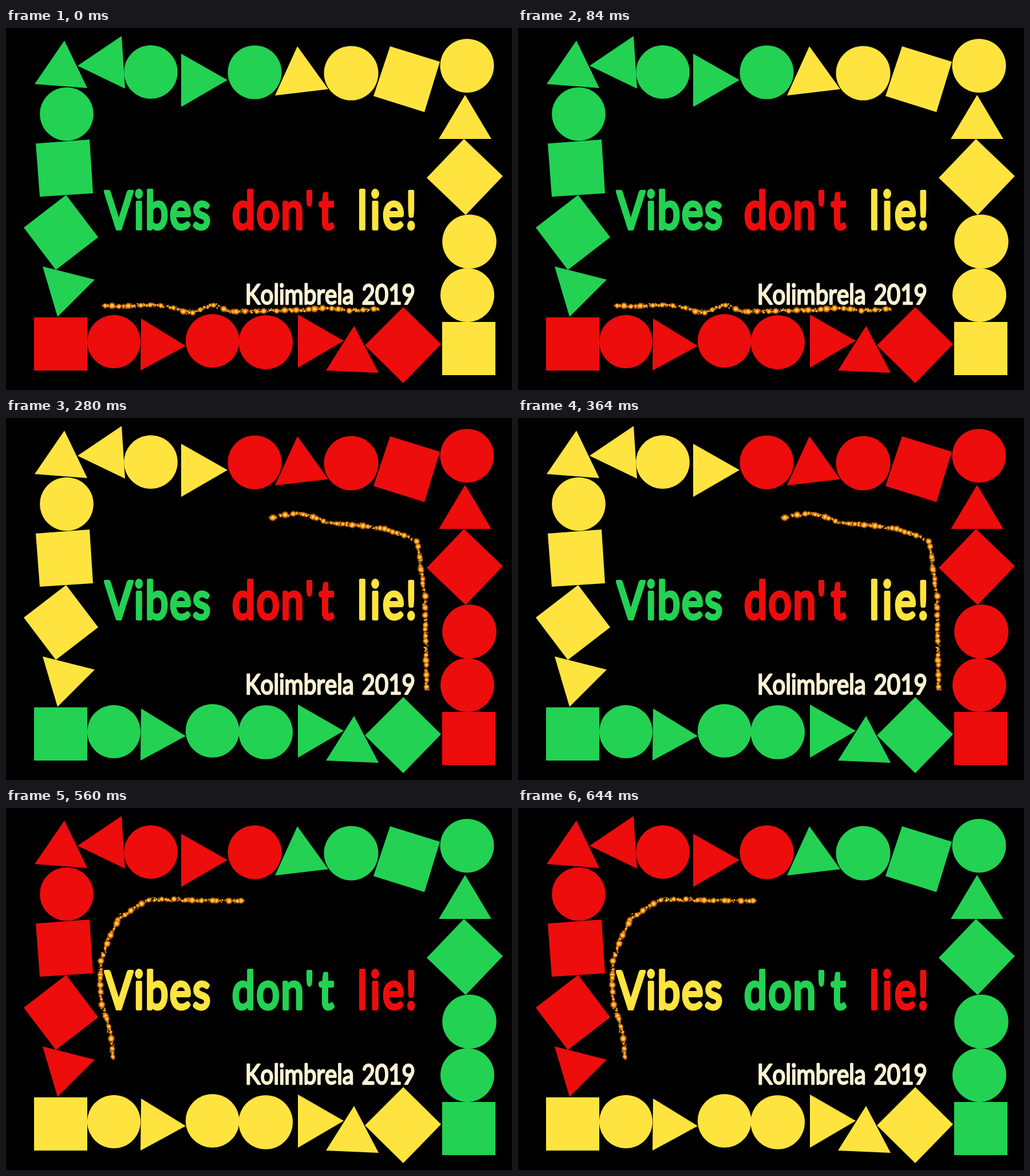
These frames come from a looping animation (884 by 633 pixels, 0.7 s). An HTML page:

```html
<!DOCTYPE html>
<html lang="en">
<head>
<meta charset="utf-8">
<title>Vibes don't lie!</title>
<style>
  html, body { margin: 0; width: 100%; height: 100%; overflow: hidden; background: #000; }
  svg { display: block; width: 100%; height: 100%; }
  :root { --g: #23d252; --y: #ffe43f; --r: #ec0d0c; }

  [data-hues] { fill: currentColor; animation: hues .7s step-end infinite; }
  @keyframes hues {
    0% { color: var(--c0); }
    20% { color: var(--c1); }
    40% { color: var(--c2); }
    60% { color: var(--c3); }
    80%, 100% { color: var(--c4); }
  }

  .strand { animation: strand .7s step-end infinite; animation-delay: calc((var(--n) - 5) * .14s); }
  .strand polyline { fill: none; }
  @keyframes strand {
    0% { opacity: 1; }
    20%, 100% { opacity: 0; }
  }

  text { font-family: Lato, "Open Sans", sans-serif; font-kerning: none; stroke: currentColor; stroke-linejoin: round; }
  .title { font-size: 91px; stroke-width: 6px; letter-spacing: 3.5px; }
  .event { font-size: 48px; stroke-width: 2.6px; word-spacing: 4px; color: #fbf2d4; fill: currentColor; text-anchor: end; }
</style>
</head>
<body>
<svg viewBox="0 0 884 633">
  <defs>
    <radialGradient id="glow">
      <stop offset="0" stop-color="#fff3a8"/>
      <stop offset=".25" stop-color="#ffc53c"/>
      <stop offset=".55" stop-color="#f08a0c" stop-opacity=".95"/>
      <stop offset="1" stop-color="#7a2800" stop-opacity=".1"/>
    </radialGradient>
  </defs>

  <!-- border, clockwise from the top left -->
  <g data-hues="gyyrr">
    <path d="M102 22L142 105L50 98ZM202 14L208 106L125 66ZM306 45L387 91L306 138Z"/>
    <circle cx="253" cy="77" r="46.8"/>
  </g>
  <g data-hues="gyrrr"><circle cx="434.5" cy="77.5" r="47"/></g>
  <g data-hues="yyrrg">
    <path d="M509 32L563 107L470 118Z"/>
    <circle cx="603" cy="79" r="47.5"/>
  </g>
  <g data-hues="yrrrg">
    <path d="M671 32L758 59L731 147L642 119Z"/>
    <circle cx="805.5" cy="66" r="47"/>
  </g>
  <g data-hues="yrrgg">
    <path d="M802 117L848 194H756ZM800 194L868 259L803 327L735 262ZM762 514H855V607H762Z"/>
    <circle cx="809.5" cy="373.5" r="47.3"/>
    <circle cx="806" cy="467" r="47"/>
  </g>
  <g data-hues="rrggy">
    <path d="M694 488L760 553L694 621L627 555ZM608 521L651 603L559 599ZM510 501L590 547L510 594Z"/>
  </g>
  <g data-hues="rggyy">
    <circle cx="453.7" cy="549.5" r="47.3"/>
    <circle cx="360.7" cy="547" r="46.8"/>
    <circle cx="188.5" cy="548.5" r="46.5"/>
    <path d="M236 508L314 556L235 599ZM49 506H142V599H49Z"/>
  </g>
  <g data-hues="ggyyr">
    <path d="M64 417L155 440L90 505ZM105 292L161 366L87 423L31 349ZM52 202L146 195L152 289L59 295Z"/>
  </g>
  <g data-hues="ggyrr"><circle cx="106" cy="150.5" r="46.8"/></g>

  <g class="title">
    <text data-hues="grgry" transform="translate(173 351) scale(.78 1)">Vibes</text>
    <text data-hues="ryryg" transform="translate(395 351) scale(.78 1)">don'<tspan dx="9">t</tspan></text>
    <text data-hues="ygygr" transform="translate(614 351) scale(.78 1)">l<tspan dx="4">i</tspan><tspan dx="2">e</tspan>!</text>
  </g>
  <text class="event" transform="translate(715 483) scale(.84 1)">Kolimbrela 2019</text>

  <!-- glitter strands -->
  <g class="strand"><polyline points="170,486 207,487 250,484 285,487 305,494 325,498 345,490 365,484 390,496 455,495 520,493 560,489 600,494 652,491"/></g>
  <g class="strand"><polyline points="663,176 690,184 708,200 718,255 724,305 740,370 746,410 745,445 738,470 717,491 690,486 655,489 610,494 558,498"/></g>
  <g class="strand"><polyline points="463,175 485,170 510,167 535,172 563,183 620,188 660,194 700,206 720,217 724,260 732,310 733,385 735,478"/></g>
  <g class="strand"><polyline points="241,216 241,200 249,185 265,172 305,160 345,156 385,156 450,160 520,167 595,174 640,183 692,185"/></g>
  <g class="strand"><polyline points="414,162 340,162 300,160 250,160 220,178 197,193 181,226 166,266 164,305 168,345 178,375 184,400 187,438"/></g>
</svg>
<script>
  for (const el of document.querySelectorAll('[data-hues]'))
    [...el.dataset.hues].forEach((hue, i) => el.style.setProperty('--c' + i, `var(--${hue})`));

  let seed = 19;
  const rand = () => (seed = seed * 16807 % 2147483647) / 2147483647;
  const spread = w => (rand() + rand() - 1) * w;
  const embers = ['#ffe07a', '#ffba38', '#f59a1c', '#d87408', '#8a3c04'];

  function dot(parent, p, jitter, r, fill) {
    const c = document.createElementNS('http://www.w3.org/2000/svg', 'circle');
    const set = { cx: p.x + spread(jitter), cy: p.y + spread(jitter), r, fill };
    for (const k in set) c.setAttribute(k, set[k]);
    parent.append(c);
  }

  document.querySelectorAll('.strand').forEach((g, n) => {
    g.style.setProperty('--n', n);
    const line = g.firstElementChild, len = line.getTotalLength();
    const at = d => line.getPointAtLength(d);
    for (let d = 0; d < len; d += 1.1)
      dot(g, at(d), 4.5, .6 + rand() * .8, embers[rand() * embers.length | 0]);
    for (let d = 0; d < len; d += 2 + rand() * 6)
      dot(g, at(d), 2.5, 2 + rand() * 2, 'url(#glow)');
    for (let d = 3; d < len; d += 5 + rand() * 20)
      dot(g, at(d), 1, 5 + rand() * 2.5, 'url(#glow)');
  });
</script>
</body>
</html>
```
